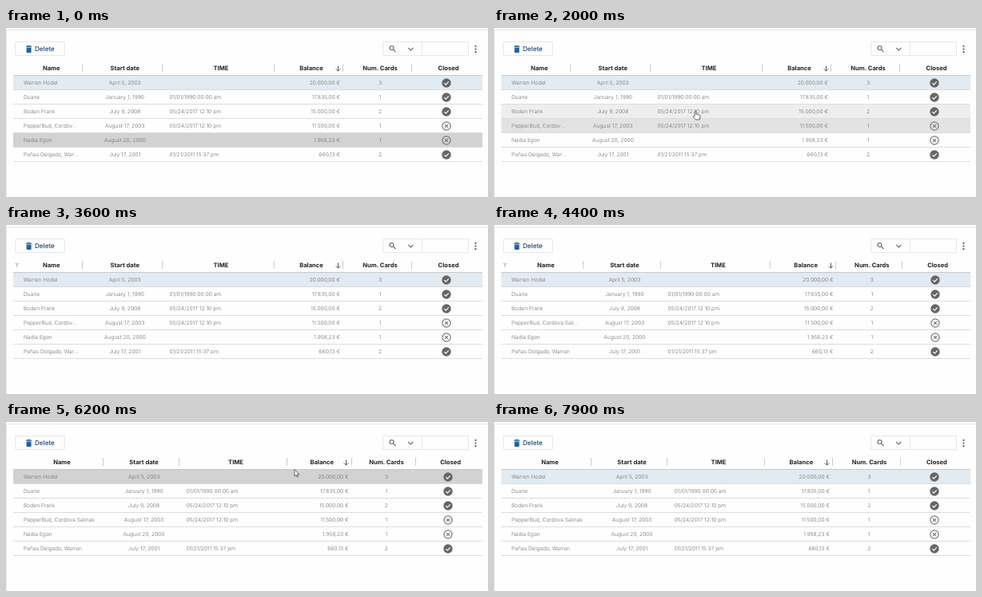
Write an HTML page that moves like this. It is 603x212 px and loops after 8 s.

```html
<!DOCTYPE html>
<html lang="en">
<head>
<meta charset="utf-8">
<title>Resizable columns</title>
<style>
html, body { margin: 0; width: 100%; height: 100%; overflow: hidden; background: #fefefe; }
body { position: relative; font: 300 6.7px Inter, "Open Sans", sans-serif; color: #707070; text-rendering: geometricPrecision; }
body > * { position: absolute; }
#frame { inset: 2px 0 0; border: solid #e8e8e8; border-width: 1px 0 0 1px; }
#bar { left: 0; top: 0; }
#delete { left: 36px; top: 17px; line-height: 19px; font-size: 8.1px; font-weight: 500; color: #1d4777; }
#table { left: 9px; top: 42px; width: 587px; }
.row { display: grid; grid-template-columns: var(--cols); height: 18px; box-sizing: border-box; border-bottom: 1px solid #dcdcdc; line-height: 18px; }
.row > div { position: relative; min-width: 0; box-sizing: border-box; white-space: nowrap; text-align: center; padding-left: 6px; }
.row > .name { text-align: left; padding: 0 4px 0 13px; overflow: hidden; text-overflow: ellipsis; }
.row > .time { text-align: left; padding-left: 8.5px; }
.row > .balance { text-align: right; padding: 0 4px 0 0; }
.row > .closed { padding: 0 3px 0 0; }
.closed svg { display: block; margin: 2.5px auto 0; }
.head { font-size: 7.6px; font-weight: 700; line-height: 17px; color: #222; border-color: #c8c8c8; }
.head > :first-child { padding-left: 9px; }
.head > :last-child { padding-left: 3px; }
.head > :not(:last-child)::after { content: ""; position: absolute; right: 0; top: 3px; height: 10px; border-right: 1px solid #cfcfcf; }
.head svg { position: absolute; right: 3.5px; top: 5px; }
#filter { left: 10px; top: 47px; }
#cursor { left: 0; top: 0; overflow: visible; fill: #fff; stroke: #444; stroke-width: .8; stroke-linejoin: round; }
</style>
</head>
<body>
<div id="frame"></div>
<svg id="bar" width="603" height="40" fill="none">
  <g stroke="#e5e8ec">
    <rect x="11.5" y="17.5" width="62" height="17" rx="1"/>
    <path d="M471.5 17.5H578.5V34.5H471.5ZM520.5 17.5V34.5"/>
  </g>
  <path fill="#1b62a5" d="M25 22.5h2l.6-.7h2l.6.7h2v1.2H25ZM25.6 24.5h6v5.6q0 1-1 1h-4q-1 0-1-1Z"/>
  <g stroke="#666" stroke-width="1.1">
    <circle cx="482.5" cy="25" r="2.5"/>
    <path d="M484.4 26.9L487.5 30M503.2 24.8L506.3 27.9L509.4 24.8"/>
  </g>
  <path d="M587.5 22.8v0M587.5 26.5v0M587.5 30.2v0" stroke="#555" stroke-width="2.2" stroke-linecap="round"/>
</svg>
<div id="delete">Delete</div>
<div id="table"></div>
<svg id="filter" width="8" height="8"><path d="M.5 .8H7L4.6 3.8V7L3 6V3.8Z" fill="#d0d0d0"/></svg>
<svg id="cursor" width="1" height="1">
  <path id="arrow" d="M0 0V8.5L2 6.8L3.3 9.6L4.6 9L3.3 6.3H6Z"/>
  <path id="hand" d="M-.9 .6Q0-.6 .9 .6V4.2L5 5Q6.2 5.4 6 6.8L5.2 11H.4L-2.6 7.4Q-2.8 6-1.6 6.2L-.9 6.8Z"/>
</svg>
<script>
const LOOP = 8000, FADE = 200, ROW_TOP = 59.5, ROW_H = 18;
const $ = id => document.getElementById(id);

const kinds = ["name", "date", "time", "balance", "cards", "closed"];
const heads = ["Name", "Start date", "TIME", "Balance", "Num. Cards", "Closed"];
const widths = [86.5, 100.5, 140, 86, 86, 88];
const data = [
  ["Warren Hodel", "April 5, 2003", "", "20.000,00 €", 3, true],
  ["Duane", "January 1, 1990", "01/01/1990 00:00 am", "17.835,00 €", 1, true],
  ["Boden Frank", "July 9, 2008", "05/24/2017 12:10 pm", "15.000,00 €", 2, true],
  ["PepperBud, Cordova Salinas", "August 17, 2003", "05/24/2017 12:10 pm", "11.500,00 €", 1, false],
  ["Nadia Egon", "August 20, 2000", "", "1.958,23 €", 1, false],
  ["Peñas Delgado, Warren", "July 17, 2001", "01/21/2011 15:37 pm", "660,13 €", 2, true]
];

// Pointer path through a few points
const path = [
  { t: 1700, x: 262, y: 142 }, { t: 2000, x: 252, y: 104 }, { t: 2700, x: 250, y: 102 },
  { t: 3300, x: 96, y: 50 }, { t: 5400, x: 122, y: 50 }, { t: 5700, x: 250, y: 97 },
  { t: 6200, x: 361, y: 59.6 }, { t: 6350, x: 352, y: 50 }
];

const progress = (t, from, to) => Math.min(1, Math.max(0, (t - from) / (to - from)));
const easeOut = u => Math.sin(u * Math.PI / 2);

function pointerAt(t) {
  const next = path.findIndex(p => p.t > t);
  if (next === 0) return path[0];
  if (next < 0) return path.at(-1);
  const a = path[next - 1], b = path[next], u = progress(t, a.t, b.t);
  return { x: a.x + (b.x - a.x) * u, y: a.y + (b.y - a.y) * u };
}

// Growing one column shrinks those to its right equally
function resize(cols, index, by) {
  const share = by / (cols.length - 1 - index);
  return cols.map((w, i) => i < index ? w : i === index ? w + by : w - share);
}

function columnsAt(t) {
  const wide = resize(widths, 0, 26.5 * easeOut(progress(t, 3750, 5300)));
  return resize(wide, 2, -13 * easeOut(progress(t, 7050, 7800)));
}

const rowAt = t => Math.floor((pointerAt(t).y - ROW_TOP) / ROW_H);

// Share of the last FADE ms the pointer spent on each row
function hoverLevels(t) {
  const steps = 40, hits = data.map(() => 0);
  for (let k = 0; k < steps; k++) {
    const r = rowAt(t - (k + .5) * FADE / steps);
    if (r >= 0) hits[r]++;
  }
  return hits.map(n => n / steps);
}

const icon = on => `<svg width="12" height="12" fill="none" stroke-width="1.2">` + (on
  ? `<circle cx="6" cy="6" r="5.7" fill="#666"/><path d="M3.3 6.2L5.2 8.1L8.8 4.4" stroke="#fff"/>`
  : `<circle cx="6" cy="6" r="5.1" stroke="#777"/><path d="M4.1 4.1L7.9 7.9M7.9 4.1L4.1 7.9" stroke="#777"/>`) + `</svg>`;
const sortArrow = `<svg width="7" height="8" fill="none" stroke="#555"><path d="M3.5 .5V7M.8 4.4L3.5 7.1L6.2 4.4"/></svg>`;

$("table").innerHTML =
  `<div class="row head">${heads.map(h => `<div>${h}${h === "Balance" ? sortArrow : ""}</div>`).join("")}</div>` +
  data.map(r => `<div class="row">${r.map((v, i) =>
    `<div class="${kinds[i]}">${kinds[i] === "closed" ? icon(v) : v}</div>`).join("")}</div>`).join("");
const rows = [...document.querySelectorAll(".row:not(.head)")];

function draw(t) {
  const cols = columnsAt(t);
  $("table").style.setProperty("--cols", cols.map(w => w + "px").join(" "));

  hoverLevels(t).forEach((a, i) => {
    rows[i].style.background = `color-mix(in srgb, #d2d2d2 ${a * 100}%, ${i ? "#fefefe" : "#e2eaf2"})`;
  });

  const { x, y } = pointerAt(t);
  const show = (id, on) => $(id).style.display = on ? "" : "none";
  show("filter", y < ROW_TOP && x < cols[0] + 24);
  show("cursor", t > 1700 && y > 52);
  show("arrow", y < 64);
  show("hand", y >= 64);
  $("cursor").style.transform = `translate(${x}px, ${y}px)`;
}

const start = performance.now();
function tick() {
  draw((performance.now() - start) % LOOP);
  requestAnimationFrame(tick);
}
tick();
</script>
</body>
</html>
```
